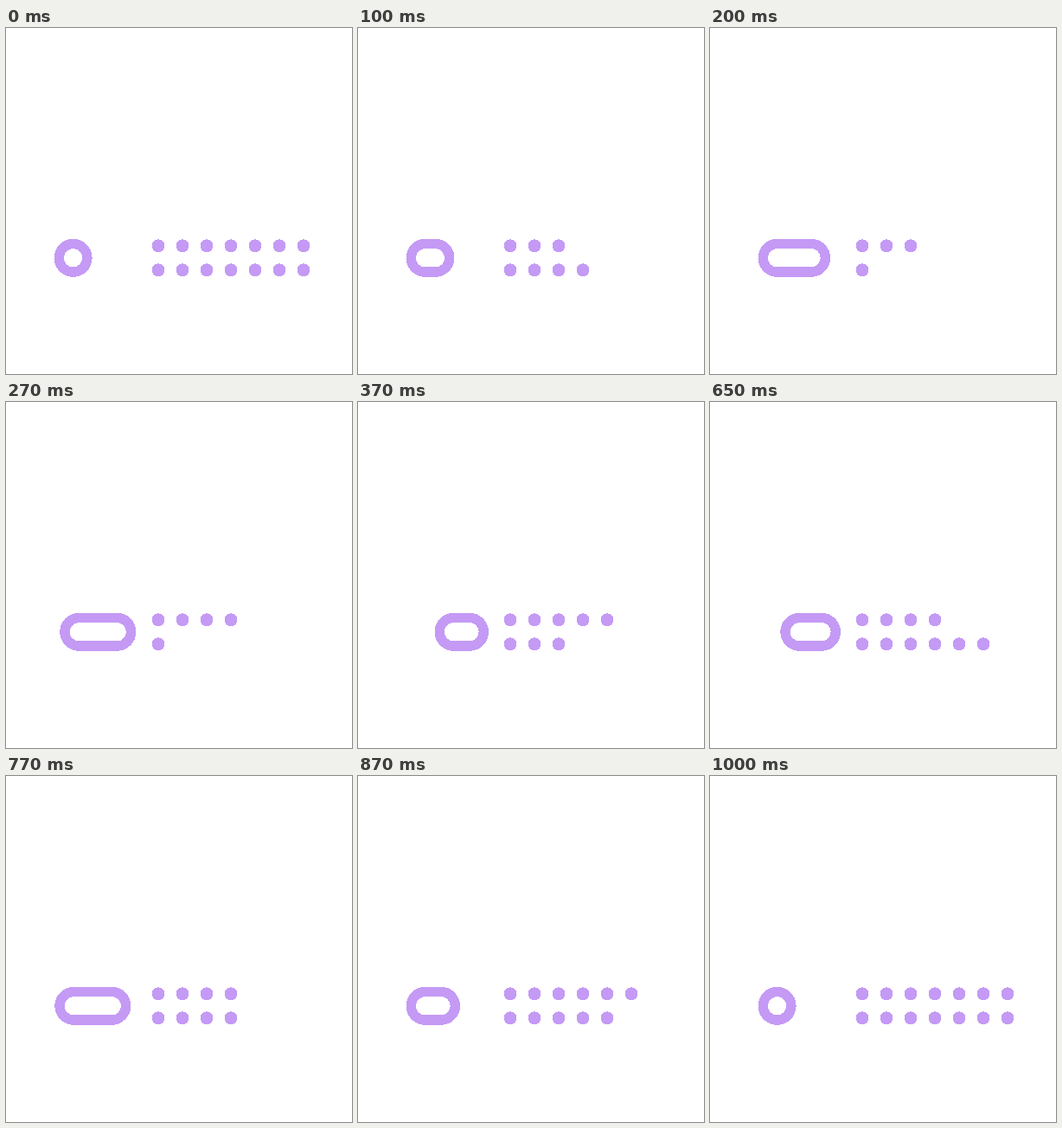
Write an HTML page that moves like this. It is 400 px wide and 400 px high and loops after 1.02 s.

```html
<!DOCTYPE html>
<html lang="en">
<head>
<meta charset="utf-8">
<style>
html, body { margin: 0; height: 100%; overflow: hidden; background: #fff; }
svg { display: block; fill: none; stroke: #c49af5; shape-rendering: crispEdges; }
line { stroke-width: 15; stroke-linecap: round; stroke-dasharray: 0 28; }
</style>
</head>
<body>
<svg width="400" height="400">
  <rect id="pill" y="249.5" height="32.6" rx="16.3" stroke-width="11.4"/>
  <line id="upper" x1="176" y1="251.8" y2="251.8"/>
  <line id="lower" x1="176" y1="279.8" y2="279.8"/>
</svg>
<script>
const LOOP = 1020, STEP = 25, CYCLE = 1000, TRAVEL = 51.4;
const [pill, upper, lower] = ['pill', 'upper', 'lower'].map(id => document.getElementById(id));

// Cubic Bezier ease-in-out (.42, 0, .58, 1), solved by bisection
function ease(x) {
  let lo = 0, hi = 1, s;
  for (let i = 0; i < 24; i++) {
    s = (lo + hi) / 2;
    const bx = 1.26 * s * (1 - s) ** 2 + 1.74 * s * s * (1 - s) + s ** 3;
    if (bx < x) lo = s; else hi = s;
  }
  return s * s * (3 - 2 * s);
}

// Eased 0 to 1 between two times, and the same rising then falling
const ramp = (t, from, to) => ease(Math.min(1, Math.max(0, (t - from) / (to - from))));
const swing = (t, from, peak, to) => ramp(t, from, peak) - ramp(t, peak, to);

// The dashed line shows one dot for each whole gap it covers
const showDots = (line, count) => line.setAttribute('x2', 176 + 28 * (count - 0.5));

function draw(now) {
  const t = Math.floor((now % LOOP + 5) / STEP) * STEP % CYCLE;
  const left = 61.3 + TRAVEL * swing(t, 200, 500, 800);
  const right = 93.9 + TRAVEL * (ramp(t, 0, 300) - ramp(t, 700, 1000));
  pill.setAttribute('x', left);
  pill.setAttribute('width', right - left);
  showDots(upper, 7 - 4.4 * swing(t, 0, 125, 575) - 3.3 * swing(t, 400, 700, 1000));
  showDots(lower, 7 - 6 * swing(t, 0, 220, 650) - 3 * swing(t, 550, 775, 1000));
}

const start = performance.now();
function tick() {
  draw(performance.now() - start);
  requestAnimationFrame(tick);
}
tick();
</script>
</body>
</html>
```
